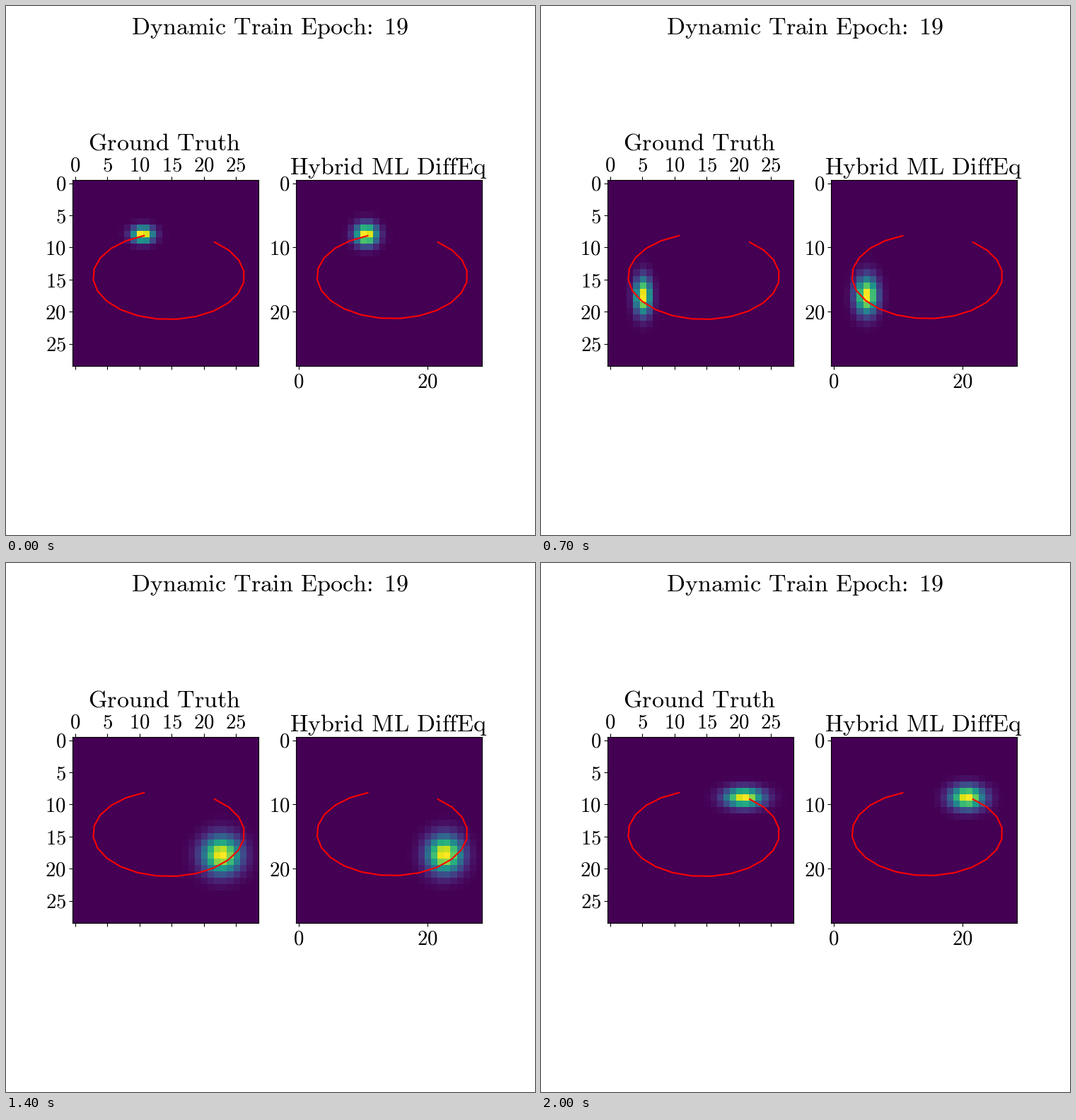
These frames come from a looping animation (748 by 748 pixels, 2.1 s). A matplotlib script:

```python
import numpy as np
import matplotlib.pyplot as plt
from matplotlib.animation import FuncAnimation

SIZE, DPI = 748, 100
CELLS, FRAMES = 29, 21

plt.rcParams["mathtext.fontset"] = "cm"

# Ellipse centre and radii, then blob widths by column and by row
PANELS = [
    dict(c=(14.53, 14.5), r=(11.78, 6.7),
         wx=([4, 5, 10, 18, 21, 25], [0.8, 0.85, 1.1, 1.9, 2.0, 1.9]),
         wy=([8, 9, 11.4, 15, 17.6, 19.8], [0.8, 1.0, 1.35, 1.65, 1.9, 2.0])),
    dict(c=(14.51, 14.45), r=(11.72, 6.63),
         wx=([4, 10, 18, 21, 25], [1.12, 1.15, 1.85, 1.75, 1.9]),
         wy=([8, 9, 11.4, 15, 17.6, 19.8], [1.12, 1.2, 1.3, 1.65, 1.9, 1.95])),
]

angle = np.radians(109 + 15.18 * np.arange(FRAMES))
grid = np.arange(CELLS)


def orbit(p):
    x = p["c"][0] + p["r"][0] * np.cos(angle)
    y = p["c"][1] - p["r"][1] * np.sin(angle)
    return x, y


def bell(centre, widths):
    return np.exp(-0.5 * ((grid - centre) / np.interp(centre, *widths)) ** 2)


def blob(p, i):
    x, y = (0.41 + 0.937 * v[i] for v in orbit(p))
    z = np.outer(bell(y, p["wy"]), bell(x, p["wx"]))
    return z / z.max()


fig, axes = plt.subplots(1, 2, figsize=(SIZE / DPI, SIZE / DPI), dpi=DPI)


def label(x, y, text, size, ha="center"):
    """Roman text with its baseline at stage pixel (x, y)."""
    text = text.replace(": ", r"\hspace{-0.2}:\hspace{0.31}")
    text = text.replace(" ", r"\hspace{0.38}")
    fig.text(x / SIZE, 1 - y / SIZE, rf"$\mathrm{{{text}}}$",
             fontsize=size, ha=ha, va="baseline")


images = []
for ax, p in zip(axes, PANELS):
    images.append(ax.imshow(blob(p, 0), vmin=0, vmax=1, cmap="viridis",
                            interpolation="nearest"))
    ax.plot(*orbit(p), color="red", lw=1.5)
    ax.set_xlim(-0.5, CELLS - 0.5)
    ax.set_ylim(CELLS - 0.5, -0.5)

left, right = axes
left.set_xticks(range(0, 26, 5))
left.set_yticks(range(0, 26, 5))
left.tick_params(top=True, labelleft=False, labelbottom=False)
right.set_xticks([0, 20])
right.set_yticks([0, 10, 20])
right.tick_params(labelleft=False, labelbottom=False)

STEP = SIZE * 0.775 / 2.2 / CELLS
X0, X1, Y0 = 98, 414.2, 250.6
TICK, TITLE = 20.8, 24.6

for n in range(0, 26, 5):
    label(X0 + n * STEP, 233, str(n), TICK)
    label(85, Y0 + n * STEP + 10.2, str(n), TICK, "right")
for n in (0, 10, 20):
    label(401.3, Y0 + n * STEP + 10.2, str(n), TICK, "right")
for n in (0, 20):
    label(X1 - 0.5 + n * STEP, 539, str(n), TICK)

label(373, 40, "Dynamic Train Epoch: 19", TITLE)
label(223.8, 204, "Ground Truth", TITLE)
label(540.7, 238.5, "Hybrid ML DiffEq", TITLE)


def update(i):
    for im, p in zip(images, PANELS):
        im.set_data(blob(p, i))
    return images


anim = FuncAnimation(fig, update, frames=FRAMES, interval=100,
                     repeat=True, repeat_delay=0)
plt.show()
```
